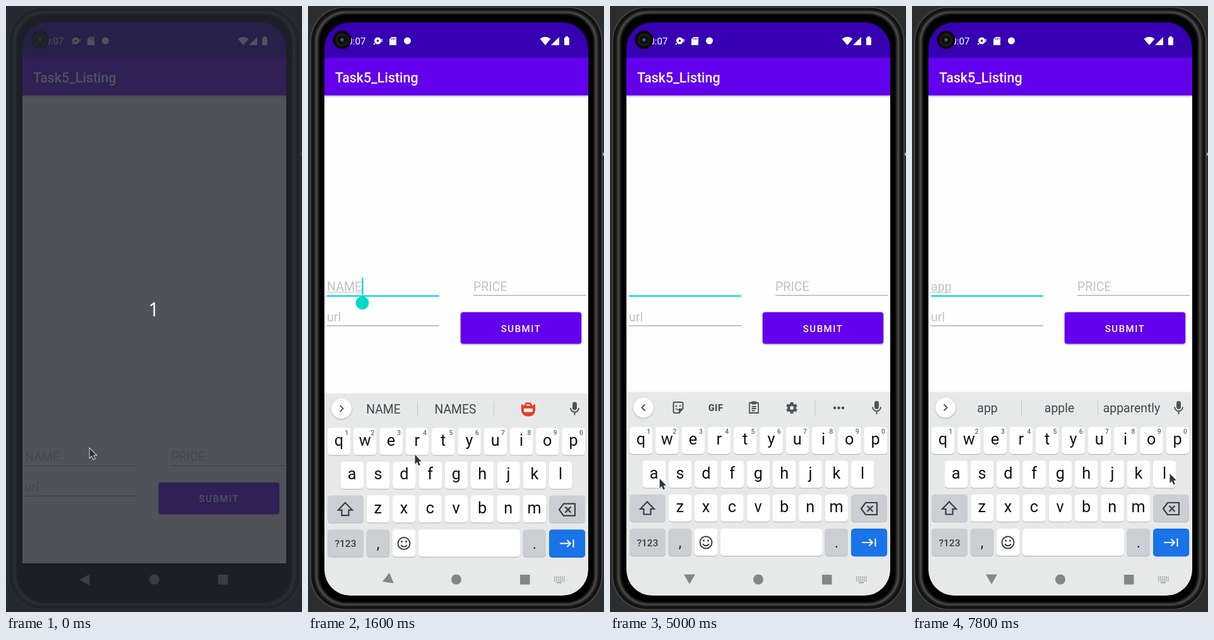
These frames come from a looping animation (469x959 px, 8 s). An HTML page with a canvas:

```html
<!DOCTYPE html>
<html lang="en">
<head>
<meta charset="utf-8">
<title>Form entry on a phone</title>
<style>
html, body { margin: 0; width: 100%; height: 100%; overflow: hidden; background: #2c2e2e; }
canvas { display: block; }
</style>
</head>
<body>
<canvas id="stage" width="469" height="959"></canvas>
<script>
const ctx = document.getElementById('stage').getContext('2d');
const LOOP = 8000, TEAL = '#03dac5', ICON = '#505357', KEY = '#cbced2', DARK = '#3c4043';

// Each entry: start time, value
const typed = [[0, 'NAME'], [2900, 'NAM'], [3300, 'NA'], [3400, 'N'], [3500, ''],
  [5900, 'a'], [6900, 'ap'], [7200, 'app']];
const strip = [[0, ['NAME', 'NAMES', '']], [2900, ['NAM', 'MAM', '']], [3300, ['NA', 'NAB', 'NAH']],
  [3400, ['N', 'NO', 'NOT']], [3600, null], [5900, ['a', 'as', 'and']],
  [6900, ['ap', 'app', 'API']], [7200, ['app', 'apple', 'apparently']]];
const popups = [[0, ''], [5700, 'a'], [5900, ''], [6800, 'p'], [6900, ''], [7100, 'p'], [7200, '']];
const slide = [[0, 321], [1300, 230], [1400, 100], [1500, 25], [1600, 1.6], [1700, 0]];
const turn = [[0, 0], [1600, 22], [1700, 65], [1800, 90]];
const caretResets = [0, 1200, 1600, 2900, 3300, 3400, 3500, 5800, 6900, 7200];
// Each entry: time, x, y
const pointer = [[0, 132.5, 700], [100, 132.7, 703], [1100, 132.7, 703], [1600, 169.5, 710], [1800, 180, 713],
  [2000, 180, 713], [2600, 425, 787.5], [3800, 425, 787.5], [3900, 389.5, 773], [4700, 83, 748],
  [4900, 83, 748], [5200, 70, 748], [5400, 70, 748], [5500, 62.5, 739], [6100, 62.5, 739],
  [6300, 303, 708], [6400, 303, 708], [6500, 432, 700], [6600, 417, 694], [7400, 417, 694],
  [7700, 408.5, 740]];

const last = (list, t) => list.filter(e => e[0] <= t).pop();
const at = (list, t) => last(list, t)[1];

function tween(list, t) {
  const a = last(list, t), b = list[list.indexOf(a) + 1];
  if (!b) return a.slice(1);
  const k = (t - a[0]) / (b[0] - a[0]);
  return a.slice(1).map((v, i) => v + (b[i + 1] - v) * k);
}

function rect(x, y, w, h, fill, r = 0) {
  ctx.fillStyle = fill;
  ctx.beginPath();
  ctx.roundRect(x, y, w, h, r);
  ctx.fill();
}

function disc(x, y, r, fill) {
  ctx.fillStyle = fill;
  ctx.beginPath();
  ctx.arc(x, y, r, 0, 7);
  ctx.fill();
}

function shape(d, fill) {
  ctx.fillStyle = fill;
  ctx.fill(new Path2D(d));
}

function line(d, color, width = 2) {
  ctx.strokeStyle = color;
  ctx.lineWidth = width;
  ctx.stroke(new Path2D(d));
}

function text(s, x, y, size, color, align = 'left', weight = 400, spacing = 0, family = 'Roboto') {
  ctx.font = `${weight} ${size}px ${family}, sans-serif`;
  ctx.letterSpacing = spacing + 'px';
  ctx.textAlign = align;
  ctx.fillStyle = color;
  ctx.fillText(s, x, y);
}

function shadowed(color, blur, dy, draw) {
  ctx.save();
  ctx.shadowColor = color;
  ctx.shadowBlur = blur;
  ctx.shadowOffsetY = dy;
  draw();
  ctx.restore();
}

function body() {
  rect(0, 0, 469, 959, '#2c2e2e');
  rect(467, 232, 2, 5, '#aaa', 1);
  // Nested rims: inset from the outer edge, colour
  const rims = [[0, '#4a4a48'], [1.5, '#121212'], [6, '#242423'], [8, '#3c3c3b'],
    [9.5, '#4c4c4a'], [11, '#2c2c2b'], [13, '#101010'], [15, '#000']];
  for (const [d, color] of rims) rect(3.5 + d, 1.5 + d * .85, 463 - 2 * d, 954 - d * 1.7, color, 54 - d * .7);
}

function statusBar() {
  rect(26, 26, 418, 56, '#3700b3');
  text('10:07', 91.5, 61, 15.2, '#fff', 'right');
  disc(110.5, 55, 5.5, '#fff');
  disc(110.5, 55, 1.8, '#3700b3');
  rect(104, 59, 2, 2, '#fff');
  rect(116.5, 52, 1.3, 5, '#fff');
  shape('M132.5 49H140V62H129V52.5Z', '#fff');
  for (const x of [132.5, 135, 137.5]) rect(x, 50.5, 1, 3, '#3700b3');
  disc(157.5, 55, 5.5, '#fff');
  shape('M376 62L367.5 52Q376 45.5 384.5 52Z', '#fff');
  shape('M385 62H398V49Z', '#fff');
  rect(406, 50, 8, 12, '#fff', 1);
  rect(408, 48, 4, 3, '#fff');
}

function form(t) {
  const word = at(typed, t), hint = '#c3c3c3', rule = '#8c8c8c';
  ctx.save();
  ctx.translate(0, t < 1300 ? 0 : -269.5);
  text(word, 30, 720, 19.6, hint);
  const width = ctx.measureText(word).width;
  if (t >= 1500 && word) rect(30, 722, width, 1, '#bbb');
  text('PRICE', 262, 720, 19.6, hint);
  text('url', 30, 768, 19.6, hint);
  if (t >= 1100) rect(30, 727.2, 178, 2.2, TEAL);
  else rect(30, 727, 178, 1.1, rule);
  rect(262, 727, 178, 1.1, rule);
  rect(30, 775, 178, 1.1, rule);
  shadowed('rgba(0,0,0,.35)', 2.5, 1.2, () => rect(241.8, 754, 191.4, 50, '#6200ee', 4));
  text('SUBMIT', 305.8, 785, 15, '#fff', 'left', 500, 1.5);
  if (t >= 1200) {
    const reset = caretResets.filter(r => r <= t).pop();
    if ((t - reset) % 1000 < 500) rect(30 + width, 699.5, 2.4, 27, TEAL);
    ctx.globalAlpha = t < 2900 ? 1 : Math.max(0, .6 - (t - 2900) * .0024);
    shape('M86 727.5L93.5 732A10.5 10.5 0 1 1 78.500 732Z', TEAL);
  }
  ctx.restore();
}

function microphone() {
  rect(419, 625, 7, 13, ICON, 3.5);
  line('M416 634.5a6.5 6.5 0 0 0 13 0M422.5 641v5', ICON);
}

function gear(x, y) {
  ctx.beginPath();
  ctx.arc(x, y, 5, 0, 7);
  ctx.strokeStyle = ICON;
  ctx.lineWidth = 4;
  ctx.stroke();
  for (let i = 0; i < 6; i++) {
    ctx.save();
    ctx.translate(x, y);
    ctx.rotate(i * Math.PI / 3);
    rect(-2.4, -9, 4.8, 4, ICON, .5);
    ctx.restore();
  }
}

function tools() {
  line('M115.5 637V629q0-2-2-2h-11q-2 0-2 2v13q0 2 2 2h7Z', ICON);
  shape('M116 637L109 644.5V637Z', ICON);
  disc(105, 633, 1.3, ICON);
  disc(111, 633, 1.3, ICON);
  line('M104 637q3.5 3.5 7 0', ICON, 1.6);
  text('GIF', 167.5, 640.7, 14.5, ICON, 'center', 900, .5);
  line('M221 628h14v16h-14ZM224.5 634h7M224.5 637h7M224.5 640.5h5', ICON, 1.8);
  rect(224, 625.5, 8, 5, ICON, 1);
  gear(288, 636);
  rect(324.5, 624, 1, 24, '#c3c6c8');
  for (const x of [356, 362.5, 369]) disc(x, 636, 2.3, ICON);
}

function badge() {
  shape('M338 628L342.5 631L345 626H353L355.5 631L360 628V639Q359 648 349 648Q339 648 338 639Z', '#ea3b2e');
  rect(342, 635.5, 14, 5.5, '#fff', 1);
  rect(346, 629, 6, 1.8, '#fff', 1);
}

function suggestions(words) {
  words.forEach((w, i) => text(w, [119.5, 233.5, 348][i], 643, 19.4, '#44474a', 'center'));
  if (!words[2]) badge();
  rect(173, 624, 1, 24, '#c3c6c8');
  rect(294, 624, 1, 24, '#c3c6c8');
}

function key(x, y, w, fill = '#fff') {
  rect(x, y + 1.2, w, 43, '#b9bcbf', 5);
  rect(x, y, w, 43, fill, 5);
}

function letters(row, x, y, digits) {
  [...row].forEach((c, i) => {
    const left = x + i * 41.3;
    key(left, y, 36.5);
    text(c, left + 18.1, y + 28, 25.3, '#111', 'center');
    if (digits) text((i + 1) % 10, left + 30.5, y + 11, 10.5, '#66696c', 'center', 500);
  });
}

function popup(c) {
  const [x, y] = c === 'a' ? [50, 643.5] : [401, 590];
  shadowed('rgba(0,0,0,.4)', 4, 1.5, () => rect(x, y, 40.5, 119, '#c9ccd0', 5));
  text(c, x + 19.5, y + 40.5, 27.5, '#111', 'center');
  if (c === 'a') for (let i = 0; i < 3; i++) rect(x + 26 + i * 3.5, y + 51.5, 1.7, 1.7, '#222');
}

function keyboard(t) {
  const off = at(slide, t), words = at(strip, t), pressed = at(popups, t);
  if (off > 320) return;
  ctx.save();
  ctx.translate(0, off);
  shadowed('rgba(0,0,0,.2)', 3, 0, () => rect(26, 612, 418, 340, '#e7e9e9'));
  shadowed('rgba(0,0,0,.25)', 3, 1, () => disc(53, 635.5, 16, '#fff'));
  line(words ? 'M50.5 630.5l5 5l-5 5' : 'M55.5 630.5l-5 5l5 5', ICON);
  if (words) suggestions(words); else tools();
  microphone();

  letters('qwertyuiop', 30.8, 666, true);
  letters('asdfghjkl', 51.6, 719.5);
  letters('zxcvbnm', 92.7, 773);
  key(31, 773, 57, KEY);
  line('M59 784.5l-11 11.5h5.5v8.5h11v-8.5h5.5Z', DARK, 2.2);
  key(382, 773, 57, t >= 2800 && t < 3600 ? '#b4b7ba' : KEY);
  line('M398 795.5l7-9.5h18v19h-18ZM407.5 791l9 9m0-9l-9 9', DARK, 2.2);

  key(31, 827, 57, KEY);
  text('?123', 59.5, 854.7, 15.5, DARK, 'center', 500);
  key(92.7, 827, 36.5, KEY);
  text(',', 111, 857, 23, '#222', 'center');
  key(134, 827, 36.5);
  line('M161.5 849a9.5 9.5 0 1 1-19 0a9.5 9.5 0 1 1 19 0M147 851.5q5 5.5 10 0', DARK);
  disc(148.5, 846, 1.5, DARK);
  disc(155.5, 846, 1.5, DARK);
  key(175, 827, 161);
  key(340.5, 827, 36.5, KEY);
  text('.', 359, 857, 23, '#222', 'center');
  rect(382, 827, 57.2, 44.3, '#1a73e8', 5);
  line('M399 849h17m-5.5-5.5l5.5 5.5l-5.5 5.5M420.5 842.5v13', '#fff');

  if (pressed) popup(pressed);
  ctx.restore();
}

function navigation(t) {
  const open = at(slide, t) < 270, color = open ? '#858787' : '#999';
  ctx.save();
  ctx.translate(125, 907);
  ctx.rotate(-at(turn, t) * Math.PI / 180);
  shape('M-8 1L7.5 -8V10Z', color);
  ctx.restore();
  disc(235, 907.5, 8, color);
  rect(336, 900, 15.5, 15.5, color, 1);
  if (!open) return;
  for (let i = 0; i < 6; i++) {
    for (let j = 0; j < 3; j++) rect(390 + i * 3, 903 + j * 3, 1.6, 1.6, color);
  }
  rect(394, 912, 8, 1.3, color);
}

function arrow(t) {
  if (t >= 100 && t < 500) return;
  const d = 'M0 0V15L3.4 11.8L5.8 17.4L8.3 16.3L5.9 10.8H10.4Z';
  ctx.save();
  ctx.translate(...tween(pointer, t));
  line(d, t < 100 ? '#fff' : 'rgba(255,255,255,.85)', 1.6);
  shape(d, '#303234');
  ctx.restore();
}

function camera() {
  disc(54, 53.5, 14.5, '#070707');
  disc(54, 53.5, 10.5, '#191919');
  disc(54, 53.5, 7, '#0e0e0e');
  disc(54, 53.5, 3, '#333b3b');
  disc(54, 53.5, 1.2, '#7c8686');
}

function draw(t) {
  body();
  ctx.save();
  ctx.beginPath();
  ctx.roundRect(26, 26, 418, 907, 41);
  ctx.clip();
  rect(26, 26, 418, 907, '#000');
  rect(26, 82, 418, 800, '#fefefe');
  form(t);
  shadowed('rgba(0,0,0,.3)', 3, 1, () => rect(26, 82, 418, 59.6, '#6200ee'));
  text('Task5_Listing', 43, 121, 21.4, '#fff', 'left', 500);
  statusBar();
  keyboard(t);
  navigation(t);
  ctx.restore();
  camera();

  if (t < 100) {
    rect(0, 0, 469, 959, 'rgba(36,40,48,.8)');
    text('1', 234, 490.5, 30, '#fff', 'center', 400, 0, '"Noto Sans"');
  }
  arrow(t);
}

const start = performance.now();
function frame() {
  const t = (performance.now() - start) % LOOP;
  draw(Math.floor(t / 100) * 100); // the screen advances ten times a second
  requestAnimationFrame(frame);
}
frame();
</script>
</body>
</html>
```
